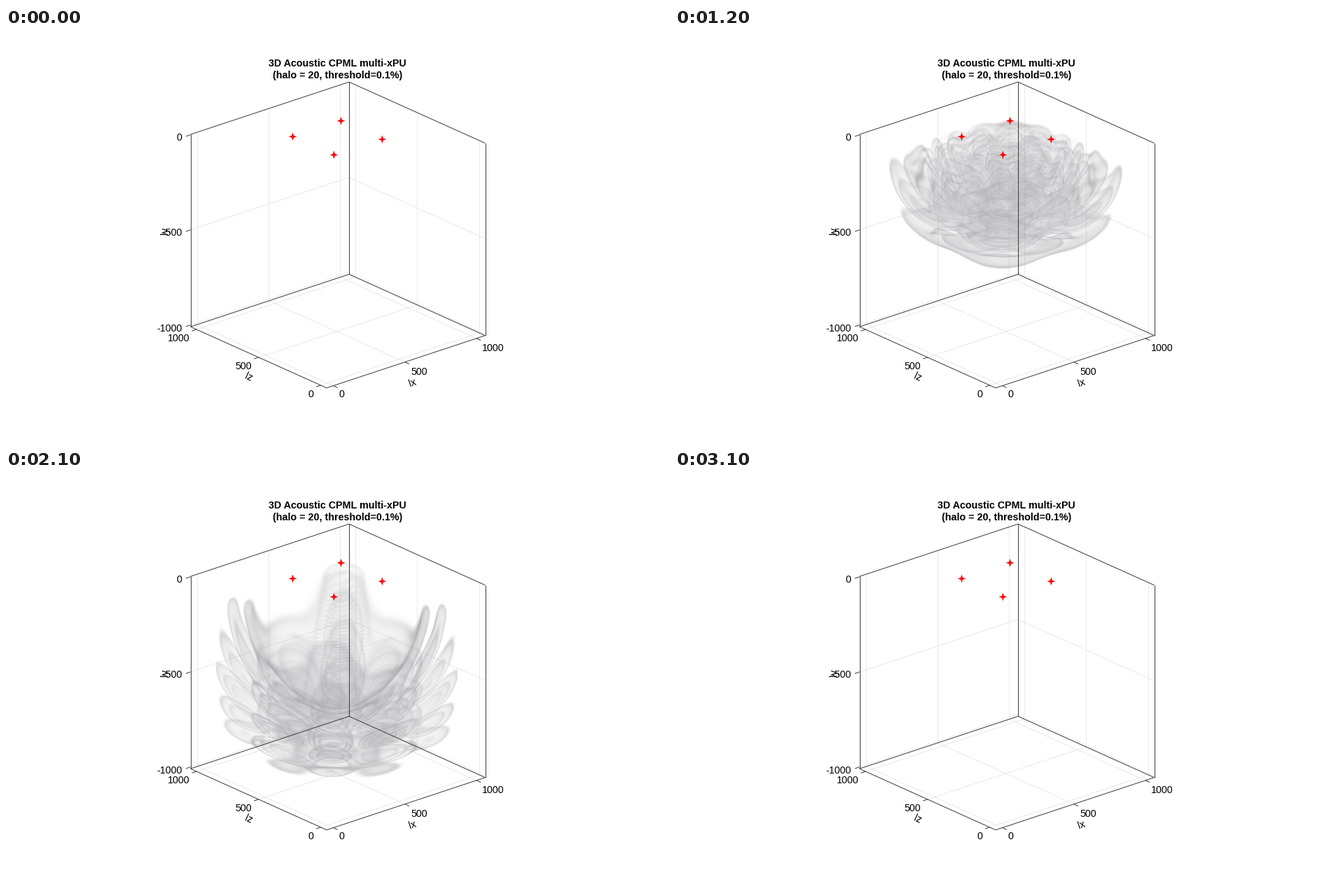
Animation, 947 px wide and 592 px high, one loop 4900 ms. Source, as a matplotlib script:

```python
import numpy as np
import matplotlib.pyplot as plt
from matplotlib.animation import FuncAnimation
from matplotlib.patches import Polygon

W, H, DPI = 947, 592, 100
PX = 72 / DPI                      # points per pixel
FRAMES, INTERVAL = 49, 100
LAST_WAVE = 30

plt.rcParams["font.family"] = "Liberation Sans"
fig = plt.figure(figsize=(W / DPI, H / DPI), dpi=DPI, facecolor="white")
ax = fig.add_axes([0, 0, 1, 1])
ax.axis("off")


# ---------- box, grid, ticks and labels ----------

def corner(u, w, v=0.0):
    """Screen place of box fractions along lx, lz and height."""
    return np.array([458 + 226.5 * u - 194.5 * w,
                     514.7 - 75 * u - 87.5 * w - 275 * v])


def line(p, q, color, z):
    ax.plot([p[0], q[0]], [p[1], q[1]], color=color, lw=PX,
            zorder=z, solid_capstyle="butt")


def label(x, y, s, ha="left", **kw):
    ax.text(x, y, s, ha=ha, va=kw.pop("va", "baseline"),
            fontsize=14.2 * PX, color="black", zorder=5, **kw)


U_TICKS = (0.042, 0.4933, 0.9446)
W_TICKS = (0.0438, 0.5, 0.956)
V_TICKS = (0.998, 0.5035, 0.009)

GRID = "#e9e9e9"
for u in U_TICKS:
    line(corner(u, 0), corner(u, 1), GRID, 1)
    line(corner(u, 1), corner(u, 1, 1), GRID, 1)
for w in W_TICKS:
    line(corner(0, w), corner(1, w), GRID, 1)
    line(corner(1, w), corner(1, w, 1), GRID, 1)
for v in V_TICKS[1:]:
    line(corner(0, 1, v), corner(1, 1, v), GRID, 1)
    line(corner(1, 1, v), corner(1, 0, v), GRID, 1)

EDGES = [((0, 0, 0), (1, 0, 0)), ((0, 0, 0), (0, 1, 0)),
         ((0, 1, 0), (1, 1, 0)), ((1, 1, 0), (1, 0, 0)),
         ((0, 1, 1), (1, 1, 1)), ((1, 1, 1), (1, 0, 1)),
         ((0, 1, 0), (0, 1, 1)), ((1, 1, 0), (1, 1, 1)),
         ((1, 0, 0), (1, 0, 1))]
INK = "#3c3c3c"
for p, q in EDGES:
    line(corner(*p), corner(*q), INK, 3)

OUT_X = np.array([-6.6, 2.2])      # outward along -lx
OUT_Z = np.array([6.2, 2.8])       # outward along -lz
for u in U_TICKS:
    line(corner(u, 0), corner(u, 0) + OUT_Z, INK, 3)
for w in W_TICKS:
    line(corner(0, w), corner(0, w) + OUT_X, INK, 3)
for v in V_TICKS:
    line(corner(0, 1, v), corner(0, 1, v) + OUT_X, INK, 3)

label(473.5, 55, "3D Acoustic CPML multi-xPU", "center", weight="bold")
label(473.5, 72, "(halo = 20, threshold=0.1%)", "center", weight="bold")
for y, s in ((161, "0"), (297, "-500"), (433.5, "-1000")):
    label(251.5, y, s, "right")
for x, y, s in ((263, 447.5, "1000"), (351, 487.5, "500"), (439, 527.5, "0")):
    label(x, y, s, "right")
for x, y, s in ((476, 528.5, "0"), (578, 495.5, "500"), (680, 461.5, "1000")):
    label(x, y, s)
label(580.5, 508, "lx", "center", va="center", rotation=18.4)
label(346.5, 500, "lz", "center", va="center", rotation=-24.4)
label(227, 290, "ly", "center", va="center", rotation=90)

angles = np.arange(8) * np.pi / 4
radii = np.where(np.arange(8) % 2, 2.1, 5.9)
STAR = np.column_stack([radii * np.cos(angles), radii * np.sin(angles)])
for place in ((409.5, 155.3), (478.5, 132.8), (537.3, 159.2), (468.4, 181.4)):
    ax.add_patch(Polygon(STAR + place, closed=True, fc="red", ec="none", zorder=6))


# ---------- wave volume, sampled along the view ----------
# A column (a, k) stands at a pixels right of the centre and k + 0.5 pixels
# nearer to the viewer; the other half follows from the half-turn symmetry.

HALF_W, DEPTH, NZ = 172, 71, 272
COLS, ROWS = 2 * HALF_W + 1, 2 * DEPTH + NZ
HALO = 0.18
SRC_DEPTH = 0.05

a, k = np.meshgrid(np.arange(-HALF_W, HALF_W + 1), np.arange(DEPTH))
a, k = a.ravel(), k.ravel()
to_ground = np.linalg.inv(np.array([[204.0, -177.0], [-67.7, -80.3]]))
gx, gz = to_ground @ np.vstack([a, k + 0.5])
inside = np.maximum(abs(gx), abs(gz)) < 0.485
a, k = a[inside], k[inside]
gx, gz = gx[inside].astype("f4"), gz[inside].astype("f4")
j = np.arange(5, 265)
depth = ((j + 0.5) / NZ).astype("f4")


def loss(dist):
    """Damping inside the absorbing halo, by distance from a wall."""
    return np.clip(HALO - dist, 0, None) ** 2


side = np.exp(-50 * (loss(0.5 - abs(gx)) + loss(0.5 - abs(gz))))
floor = np.exp(-100 * loss(1 - depth))
damping = (floor[:, None] * side[None, :]).astype("f4")

R_STEP, R_MAX = 0.001, 1.6
ranges = []
for sx in (-1 / 6, 1 / 6):
    for sz in (-1 / 6, 1 / 6):
        flat = (gx - sx) ** 2 + (gz - sz) ** 2
        r = np.sqrt(flat[None, :] + (depth[:, None] - SRC_DEPTH) ** 2)
        ranges.append((r / R_STEP).astype(np.intp))

near = ((j[:, None] + k + DEPTH) * COLS + a + HALF_W).ravel()
far = ((j[:, None] - k + DEPTH - 1) * COLS + HALF_W - a).ravel()

# Opacity as a function of pressure: a few soft contour levels
P_SCALE = 400
press = np.arange(1200) / P_SCALE
opacity = sum(wt * np.exp(-((press - lv) / wd) ** 2)
              for lv, wt, wd in ((0.37, 0.065, 0.045),
                                 (0.72, 0.055, 0.055),
                                 (1.2, 0.045, 0.06))).astype("f4")
opacity[press < 0.22] = 0

r_axis = np.arange(0, R_MAX, R_STEP)


def pulse(t):
    """Ricker shell around one source, as a table over distance."""
    s = ((r_axis - (0.046 * t - 0.16)) / 0.07) ** 2
    fade = np.maximum(r_axis, 0.02) ** -0.35
    return ((1 - 2 * s) * np.exp(-s) * fade).astype("f4")


cache = {}


def wave_image(t):
    if t not in cache:
        table = pulse(t)
        p = np.take(table, ranges[0], mode="clip")
        for r in ranges[1:]:
            p += np.take(table, r, mode="clip")
        np.abs(p, out=p)
        p *= damping
        # the top halo keeps absorbing what travels along it
        p *= (P_SCALE * np.exp(-9 * t * loss(depth))).astype("f4")[:, None]
        tau = np.take(opacity, p.astype(np.intp), mode="clip").ravel()
        size = ROWS * COLS
        total = np.bincount(near, tau, size) + np.bincount(far, tau, size)
        img = np.empty((ROWS, COLS, 4), "f4")
        img[..., :3] = (0.63, 0.63, 0.645)
        img[..., 3] = 1 - np.exp(-total.reshape(ROWS, COLS))
        cache[t] = img
    return cache[t]


LEFT, TOP = 300, 86
wave = ax.imshow(np.zeros((ROWS, COLS, 4)), interpolation="nearest", zorder=2,
                 extent=(LEFT, LEFT + COLS, TOP + ROWS, TOP), aspect="auto")
ax.set_xlim(0, W)
ax.set_ylim(H, 0)


def draw(i):
    moving = 0 < i <= LAST_WAVE
    wave.set_visible(moving)
    if moving:
        wave.set_data(wave_image(i))
    return [wave]


anim = FuncAnimation(fig, draw, frames=FRAMES, interval=INTERVAL,
                     init_func=lambda: draw(0), repeat=True, repeat_delay=0)
plt.show()
```
